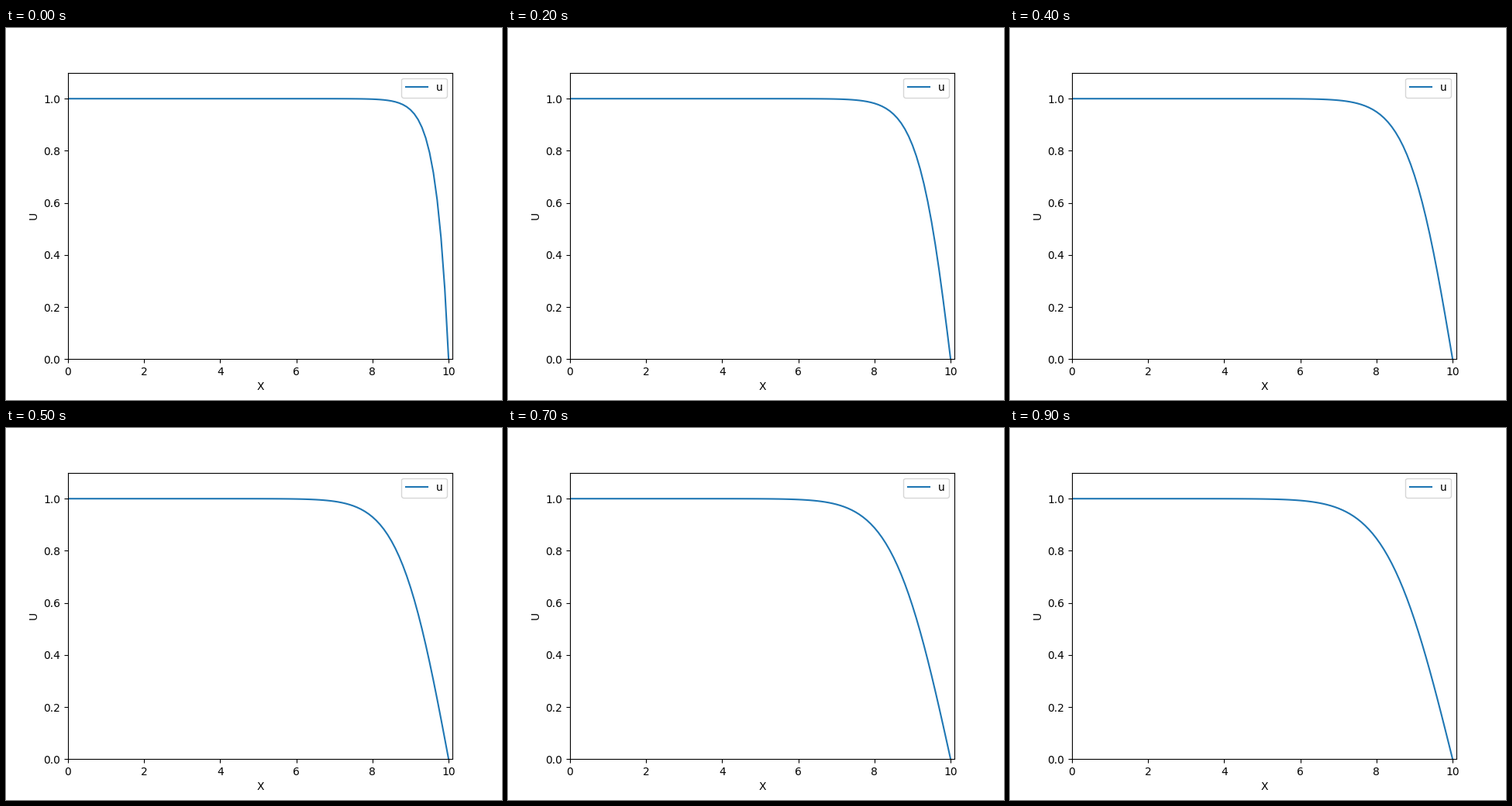
A matplotlib script that plays this animation: 640x480 px, repeating every 1000 ms.

```python
import numpy as np
import matplotlib.pyplot as plt
from matplotlib.animation import FuncAnimation

LENGTH, DX = 10.0, 0.1
DIFFUSIVITY, DT = 1.0, 0.1
STEPS, INTERVAL = 10, 100


def diffuse(x, steps):
    """Implicit Euler solution of u_t = D u_xx with u(0) = 1, u(L) = 0."""
    n = len(x)
    r = DIFFUSIVITY * DT / DX**2
    matrix = ((1 + 2 * r) * np.eye(n)
              - r * (np.eye(n, k=1) + np.eye(n, k=-1)))
    for end in (0, -1):
        matrix[end] = 0
        matrix[end, end] = 1

    u = np.ones(n)
    u[-1] = 0
    profiles = []
    for _ in range(steps):
        u = np.linalg.solve(matrix, u)
        profiles.append(u)
    return profiles


x = np.linspace(0, LENGTH, round(LENGTH / DX) + 1)
profiles = diffuse(x, STEPS)

plt.rcParams["font.family"] = "DejaVu Sans"
fig, ax = plt.subplots(figsize=(6.4, 4.8), dpi=100)
ax.set(xlim=(0, LENGTH + DX), ylim=(0, 1.1), xlabel="X", ylabel="U")
line, = ax.plot(x, profiles[0], color="#1f77b4", label="u")
ax.legend(loc="upper right")


def update(step):
    line.set_ydata(profiles[step])
    return line,


animation = FuncAnimation(fig, update, frames=STEPS, interval=INTERVAL,
                          repeat=True, repeat_delay=0)
plt.show()
```
